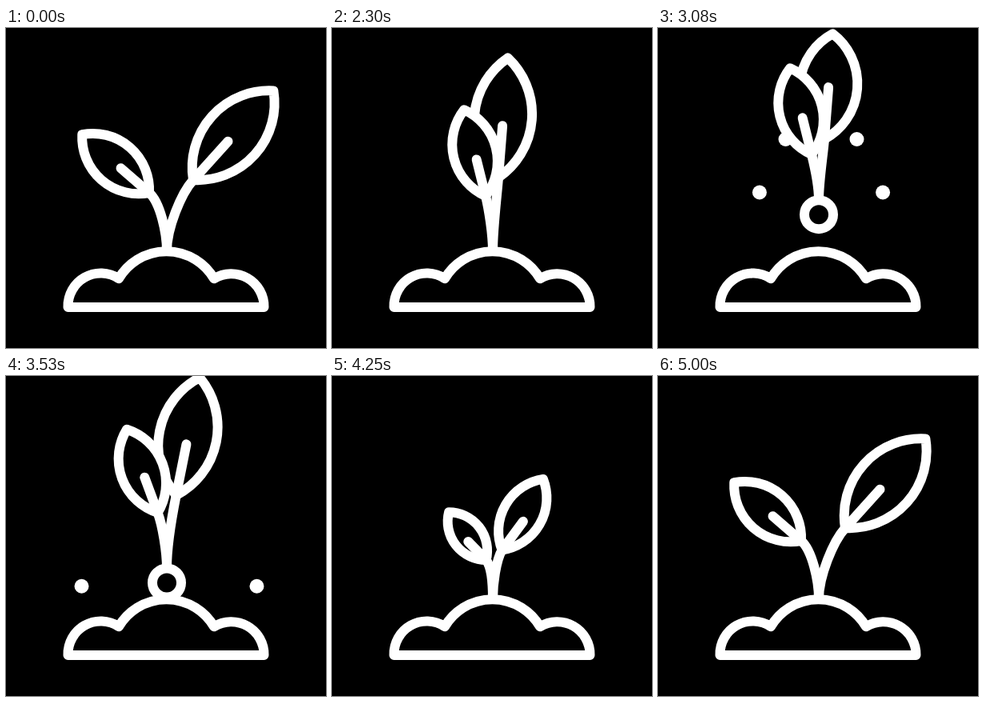
These frames come from a looping animation (400x400 px, 5.03 s). An HTML page:

```html
<!DOCTYPE html>
<html lang="en">
<head>
<meta charset="utf-8">
<title>Sprout</title>
<style>
  html, body { margin: 0; width: 100%; height: 100%; overflow: hidden; background: #000; }
  svg { display: block; width: 100vw; height: 100vh; }
  path, .root { fill: #000; stroke: #fff; stroke-width: 12; stroke-linecap: round; stroke-linejoin: round; }
  .line { fill: none; }
  .dot { fill: #fff; }
</style>
</head>
<body>
<svg viewBox="0 0 400 400">
  <g id="dots">
    <circle class="dot" r="9"/><circle class="dot" r="9"/>
    <circle class="dot" r="9"/><circle class="dot" r="9"/>
  </g>
  <g id="plant">
    <path id="rightLeaf"/><path id="rightStem" class="line"/>
    <path id="leftLeaf"/><path id="leftStem" class="line"/>
    <circle id="root" class="root" cx="201" r="18"/>
  </g>
  <path d="M77.5 349A41 41 0 0 1 141 313.3A69 69 0 0 1 260 313.3A41 41 0 0 1 322.5 349Z"/>
</svg>
<script>
const LOOP = 5030, START = 2030, STEP = 30;
const CX = 201, GROUND = 279;
const LEAP = 3680, REGROW = 3900;
const $ = id => document.getElementById(id);
const dots = [...$('dots').children];

const mix = (a, b, u) => a + (b - a) * u;
const progress = (t, from, to) => Math.min(1, Math.max(0, (t - from) / (to - from)));
const easeInOut = u => u < 0.5 ? 2 * u * u : 1 - 2 * (1 - u) ** 2;

// Leaf bases are relative to the foot of the stem
const LEAVES = [
  { name: 'right', side: 1, length: 150, half: 36, vein: 65, give: 0.7,
    open: { x: 33, y: -89, angle: 42 }, shut: { x: 7, y: -92, angle: 4.5 } },
  { name: 'left', side: -1, length: 111, half: 27, vein: 47, give: 0,
    open: { x: -22, y: -73, angle: -49 }, shut: { x: -9, y: -69, angle: -14 } }
];

const THROWS = [
  { launch: 2766, spread: 30, rate: 0.0054, apex: 3130, top: 136 },
  { launch: 2937, spread: 91, rate: 0.0069, apex: 3252, top: 170 }
];

function poseAt(t) {
  if (t >= REGROW) {
    const left = (1 - progress(t, REGROW, 5000)) ** 3;
    return { foot: GROUND, fold: left, grow: Math.max(0.01, 1 - left), squash: 0 };
  }
  const pull = progress(t, 2300, 2540);
  const rise = easeInOut(progress(t, 2540, 2900));
  const settle = progress(t, 2900, 3530);
  return {
    foot: GROUND - 74 * rise + 44 * progress(t, 2900, LEAP),
    fold: easeInOut(progress(t, 2000, 2300)) - 0.43 * progress(t, 3080, LEAP) ** 3,
    grow: 1,
    squash: 0.24 * rise * (1 - settle) - 0.04 * pull * (1 - rise)
  };
}

function drawLeaf(leaf, { foot, fold, grow, squash }) {
  const { name, side, open, shut } = leaf;
  const blend = key => mix(open[key], shut[key], fold);
  const x = CX + blend('x') * grow ** 2;
  const y = foot + blend('y') * grow * (1 - squash);
  const along = (angle, d) => {
    const a = angle * Math.PI / 180;
    return `${x + Math.sin(a) * d} ${y - Math.cos(a) * d}`;
  };
  const angle = blend('angle');
  const length = leaf.length * grow * (1 - squash * leaf.give), half = leaf.half * grow;
  const r = (length ** 2 / 4 + half ** 2) / (2 * half);
  const reach = Math.hypot(x - CX, y - foot);
  const veinAngle = angle + side * 20 * (1 - grow);
  $(name + 'Leaf').setAttribute('d',
    `M${x} ${y}A${r} ${r} 0 0 1 ${along(angle, length)}A${r} ${r} 0 0 1 ${x} ${y}Z`);
  $(name + 'Stem').setAttribute('d',
    `M${CX} ${foot}C${CX} ${foot - 0.3 * reach} ${along(angle, -0.24 * reach)} ${x} ${y}` +
    `L${along(veinAngle, leaf.vein * grow)}`);
}

function drawDots(t) {
  THROWS.forEach(({ launch, spread, rate, apex, top }, i) => {
    const offset = 20 + spread * (1 - Math.exp(-rate * (t - launch)));
    const shown = t >= launch && t < 2 * apex - launch + STEP;
    [-1, 1].forEach((side, j) => {
      const dot = dots[2 * i + j];
      dot.setAttribute('cx', 204 + side * offset);
      dot.setAttribute('cy', top + 0.0012 * (t - apex) ** 2);
      dot.style.display = shown ? '' : 'none';
    });
  });
}

function draw(t) {
  const pose = poseAt(t);
  LEAVES.forEach(leaf => drawLeaf(leaf, pose));
  $('root').setAttribute('cy', pose.foot + 18);
  const leap = t < REGROW ? progress(t, LEAP, REGROW) ** 2 : 0;
  $('plant').setAttribute('transform',
    `translate(${270 * leap} ${-150 * leap}) rotate(${40 * leap} ${CX} ${pose.foot})`);
  drawDots(t);
}

function tick() {
  const t = performance.now() % LOOP;
  draw(t < START ? 0 : START + STEP * Math.floor((t - START) / STEP));
  requestAnimationFrame(tick);
}
tick();
</script>
</body>
</html>
```
